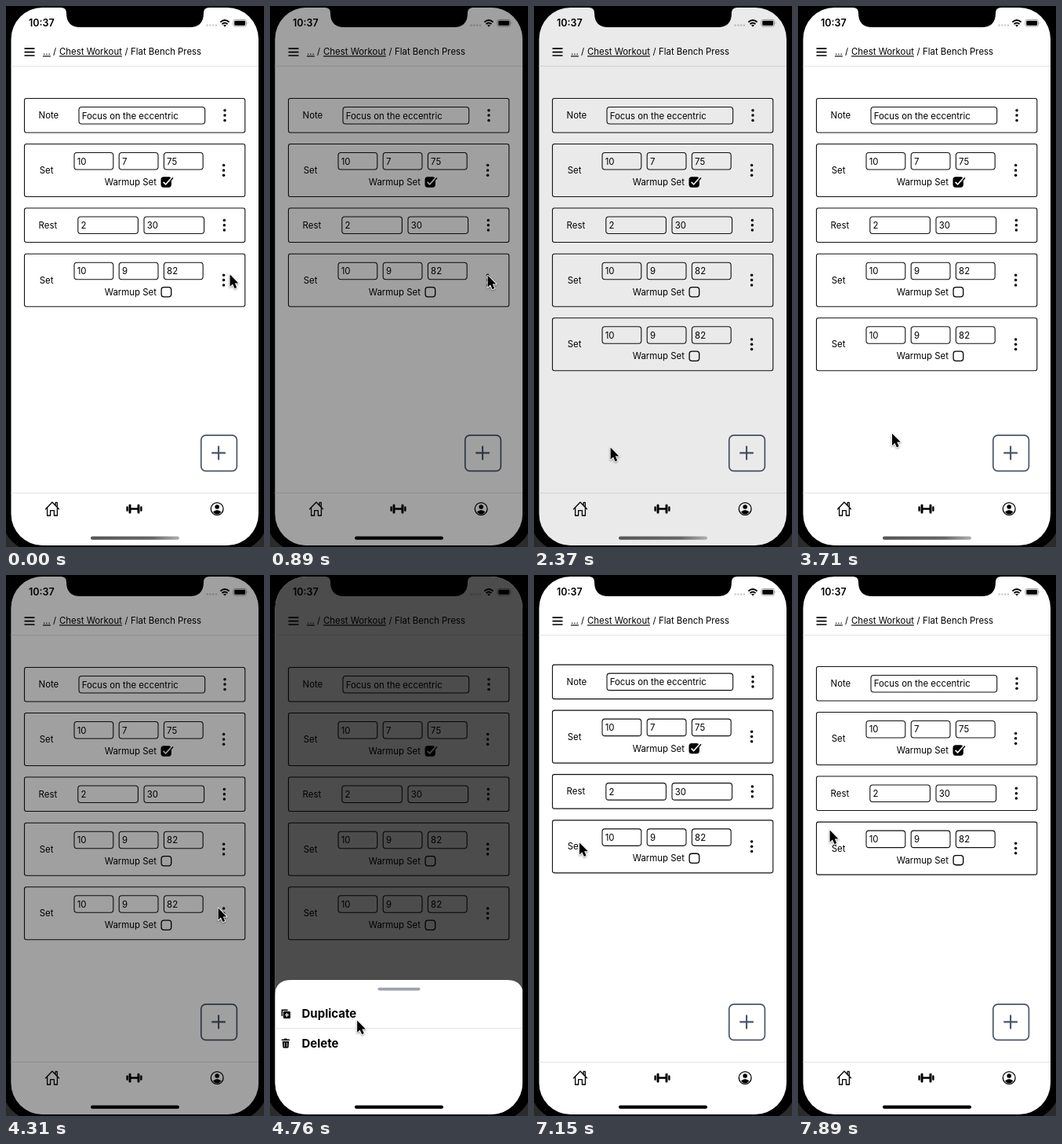
Recreate the animation shown at these times as an HTML page. Size 329x688 px, loop 8000 ms.

```html
<!DOCTYPE html>
<html lang="en">
<head>
<meta charset="utf-8">
<title>Workout editor</title>
<style>
  html, body { margin: 0; width: 100%; height: 100%; overflow: hidden; background: #000; }
  svg { display: block; width: 329px; height: 688px; }
  text { font: 11.4px Inter, Roboto, sans-serif; fill: #000; white-space: pre; }
  .time { font-size: 12.5px; font-weight: 600; }
  .link { text-decoration: underline; }
  .action { font-size: 15px; font-weight: 700; }
  .line { fill: none; stroke: #000; stroke-width: 1.3; stroke-linejoin: round; stroke-linecap: round; }
  .box { fill: none; stroke: #111; stroke-width: 1.1; }
  .rule { stroke: #e4e4e6; stroke-width: 1; }
  #cursor path { stroke: #fff; stroke-width: 1.8; stroke-linejoin: round; paint-order: stroke; }
  #cursor { filter: drop-shadow(0 1px 1px #0006); }
</style>
</head>
<body>
<svg viewBox="0 0 329 688">
  <defs>
    <clipPath id="screen"><rect x="6.5" y="2" width="315.5" height="684" rx="40"/></clipPath>
    <linearGradient id="glow">
      <stop offset="0" stop-color="#555"/>
      <stop offset=".7" stop-color="#666"/>
      <stop offset="1" stop-color="#b0b0b0"/>
    </linearGradient>
  </defs>

  <!-- phone body -->
  <rect width="329" height="688" fill="#2b2b2b"/>
  <rect x="-5" y="-60" width="339" height="754" rx="44"/>

  <g clip-path="url(#screen)">
    <rect width="329" height="688" fill="#fff"/>

    <!-- status bar -->
    <text class="time" x="29" y="26.3">10:37</text>
    <path d="M255.5 24.5H269" stroke="#c4c4c4" stroke-width="2.2" stroke-dasharray="2.2 1.6"/>
    <g fill="none" stroke="#000" stroke-width="1.9">
      <path d="M273.4 20.5Q279 15.6 284.6 20.5M275.5 23Q279 20 282.5 23"/>
      <path d="M279 26.6l-2-2.1q2-1.6 4 0z" fill="#000" stroke="none"/>
    </g>
    <rect x="289.9" y="17.4" width="16.6" height="8.6" rx="2.5" fill="none" stroke="#999" stroke-width=".9"/>
    <rect x="291.2" y="18.7" width="14" height="6" rx="1.4"/>
    <path d="M307.8 20.3q1.5 1.4 0 2.8z" fill="#999"/>

    <!-- header -->
    <path d="M23.5 54.2h13M23.5 58.6h13M23.5 63h13" stroke="#000" stroke-width="1.7"/>
    <text class="link" x="47" y="62.3">...</text>
    <text x="60" y="62.3">/</text>
    <text class="link" x="68" y="62.3">Chest Workout</text>
    <text x="151.5" y="62.3">/</text>
    <text x="159" y="62.3">Flat Bench Press</text>
    <path class="rule" d="M6 76.5H323"/>

    <g id="list"></g>

    <!-- add button -->
    <g fill="#fff" stroke="#4a566b">
      <rect x="248.8" y="545.8" width="45.6" height="45.6" rx="6" stroke-width="1.7"/>
      <path d="M262.3 568.4h17.6M271.1 559.6v17.6" stroke-width="2.1"/>
    </g>

    <!-- tab bar -->
    <path class="rule" d="M6 619.5H323"/>
    <path class="line" d="M50.5 639.8L59 631l8.5 8.8M52.6 638v10h4v-6.4h4.8v6.4h4v-10M65.3 637v-5.6h-2.2v3.2"/>
    <path d="M158 639.5h11" stroke="#000" stroke-width="2.4"/>
    <path d="M154.6 637.4v4.2M172.4 637.4v4.2" stroke="#000" stroke-width="2.4" stroke-linecap="round"/>
    <path d="M158 635v9M169 635v9" stroke="#000" stroke-width="3" stroke-linecap="round"/>
    <circle class="line" cx="269.2" cy="639.5" r="7.9"/>
    <circle cx="269.2" cy="637" r="2.8"/>
    <path d="M263.8 643.6q5.4-5 10.8 0-5.4 5.6-10.8 0z"/>

    <rect id="shade" width="329" height="688" opacity="0"/>

    <g id="sheet" transform="translate(0 174)">
      <path d="M6 700V536q0-21 21-21H302q21 0 21 21V700z" fill="#fff"/>
      <rect x="137.5" y="524.8" width="54" height="3.6" rx="1.8" fill="#9ca3af"/>
      <g id="duplicate">
        <path d="M14.6 552.6h8v1.6h-6.4v6.8h-1.6z"/>
        <rect x="17" y="555" width="9" height="9" rx="1.2"/>
        <path d="M21.5 557v5M19 559.5h5" stroke="#fff" stroke-width="1.2"/>
        <text class="action" x="40.5" y="563.3">Duplicate</text>
      </g>
      <g id="delete">
        <path class="rule" d="M6 576.5H323"/>
        <path d="M14.8 590.6h3l.7-1.2h2.9l.7 1.2h3v1.5H14.8zM15.8 593h8.4l-.6 7.6q-.1 1-1 1h-5.2q-.9 0-1-1z"/>
        <path d="M18.3 594.5v5.4M21.7 594.5v5.4" stroke="#fff" stroke-width=".8"/>
        <text class="action" x="40.5" y="601">Delete</text>
      </g>
    </g>

    <rect id="bar" x="108" y="674.6" width="113" height="4.2" rx="2.1" fill="url(#glow)"/>
  </g>

  <path d="M70 0V2q7 0 7 7 0 18 18 18H234q18 0 18-18 0-7 7-7V0z"/>

  <g id="cursor"><path d="M.6.6V15.8L4 12.6l2.6 5.6 2.6-1.2L6.8 11.5h4.6z"/></g>
</svg>

<script>
  const $ = id => document.getElementById(id);

  // Workout list
  const text = (x, y, s) => `<text x="${x}" y="${y}">${s}</text>`;
  const box = (x, y, w, h, r) =>
    `<rect class="box" x="${x}" y="${y}" width="${w}" height="${h}" rx="${r}"/>`;
  const input = (x, w, s) => box(x, 11, w, 21.5, 3.5) + text(x + 3.7, 26, s);
  const dots = (x, y) =>
    [-6.3, 0, 6.3].map(d => `<circle cx="${x}" cy="${y + d}" r="1.75"/>`).join('');
  const row = (id, y, h, body) =>
    `<g id="${id}"><g transform="translate(0 ${y})">${box(23.5, 0, 281.3, h, 2.5)}${body}</g></g>`;

  const check = `<rect x="197.5" y="41.8" width="13.4" height="13.4" rx="3.6"/>
    <path d="M200.6 48.4l3 3 8-8.8" fill="none" stroke="#fff" stroke-width="1.6"/>
    <path d="M210.4 46l2.6-3" stroke="#000" stroke-width="1.4"/>`;
  const empty = `<rect class="line" x="198.1" y="42.4" width="12.6" height="12.2" rx="3.4"/>`;

  const setRow = (id, y, values, done) => row(id, y, 67,
    text(42.8, 37.6, 'Set') +
    values.map((v, i) => input(87 + 57.2 * i, 49.8, v)).join('') +
    text(125.8, 52.4, 'Warmup Set') + (done ? check : empty) + dots(277.6, 33.4));

  $('list').innerHTML =
    row('note', 117.5, 43.5,
      text(41.6, 25.8, 'Note') + input(93, 160.7, 'Focus on the eccentric') + dots(279, 21.6)) +
    setRow('warmup', 175.5, [10, 7, 75], true) +
    row('rest', 257, 43.5,
      text(41.6, 25.8, 'Rest') + input(91.8, 76.6, 2) + input(176, 76.6, 30) + dots(278.4, 21.7)) +
    setRow('work', 315.2, [10, 9, 82]) +
    setRow('copy', 396.8, [10, 9, 82]);

  // Motion
  const LOOP = 8000, TICK = LOOP / 54;
  const ramp = (t, from, time) => Math.min(1, Math.max(0, (t - from) / time));
  const ease = p => p * p * (3 - 2 * p);
  const mix = (a, b, p) => a + (b - a) * p;
  const fade = (id, v) => $(id).setAttribute('opacity', v);
  const shift = (id, x, y) => $(id).setAttribute('transform', `translate(${x} ${y})`);

  const home = { x: 285, y: 341 };
  const moves = [
    { at: 0, time: 140, x: 277, y: 342 },
    { at: 1190, time: 610, x: 97, y: 561 },
    { at: 3600, time: 460, x: 270, y: 423 },
    { at: 4300, time: 600, x: 77, y: 596 },
    { at: 5640, time: 580, x: 74, y: 355, bow: 84 },
    { at: 6830, time: 570, x: 40, y: 324 }
  ];
  const menus = [
    { button: 'duplicate', open: 730, close: 2106, fall: 300 },
    { button: 'delete', open: 4137, close: 5450, fall: 1 }
  ];

  function cursorAt(t) {
    return moves.reduce((from, m) => {
      const p = ease(ramp(t, m.at, m.time));
      return {
        x: mix(from.x, m.x, p) + (m.bow || 0) * Math.sin(Math.PI * p),
        y: mix(from.y, m.y, p)
      };
    }, home);
  }

  function draw(t) {
    const { x, y } = cursorAt(t);
    shift('cursor', x, y);

    let shade = 0, lift = 0;
    for (const { button, open, close, fall } of menus) {
      const closing = ramp(t, close, fall);
      shade += .7 * (ramp(t, open, 300) - closing);
      lift += ease(ramp(t, open + 170, 285)) - ease(ramp(closing, 0, .8));
      fade(button, 1 - .8 * (ramp(t, close - 250, 190) - closing));
    }
    const [dup, del] = menus;
    fade('shade', shade);
    shift('sheet', 0, 174 * (1 - lift));
    fade('copy', +(t > dup.close && t < del.close));

    const dark = t > del.open || (t > dup.open && t < dup.close + 150);
    $('bar').setAttribute('fill', dark ? '#000' : 'url(#glow)');

    // Press on the last set, then an overscroll that springs back.
    fade('work', 1 - .8 * (ramp(t, 6400, 240) - ramp(t, 6830, 250)));
    shift('list', 0, 7 * (ease(ramp(t, 7400, 600)) - ease(ramp(t, 6840, 560))));
  }

  const start = performance.now();
  function frame() {
    const t = (performance.now() - start + 20) % LOOP;
    draw(Math.floor(t / TICK) * TICK);
    requestAnimationFrame(frame);
  }
  frame();
</script>
</body>
</html>
```
